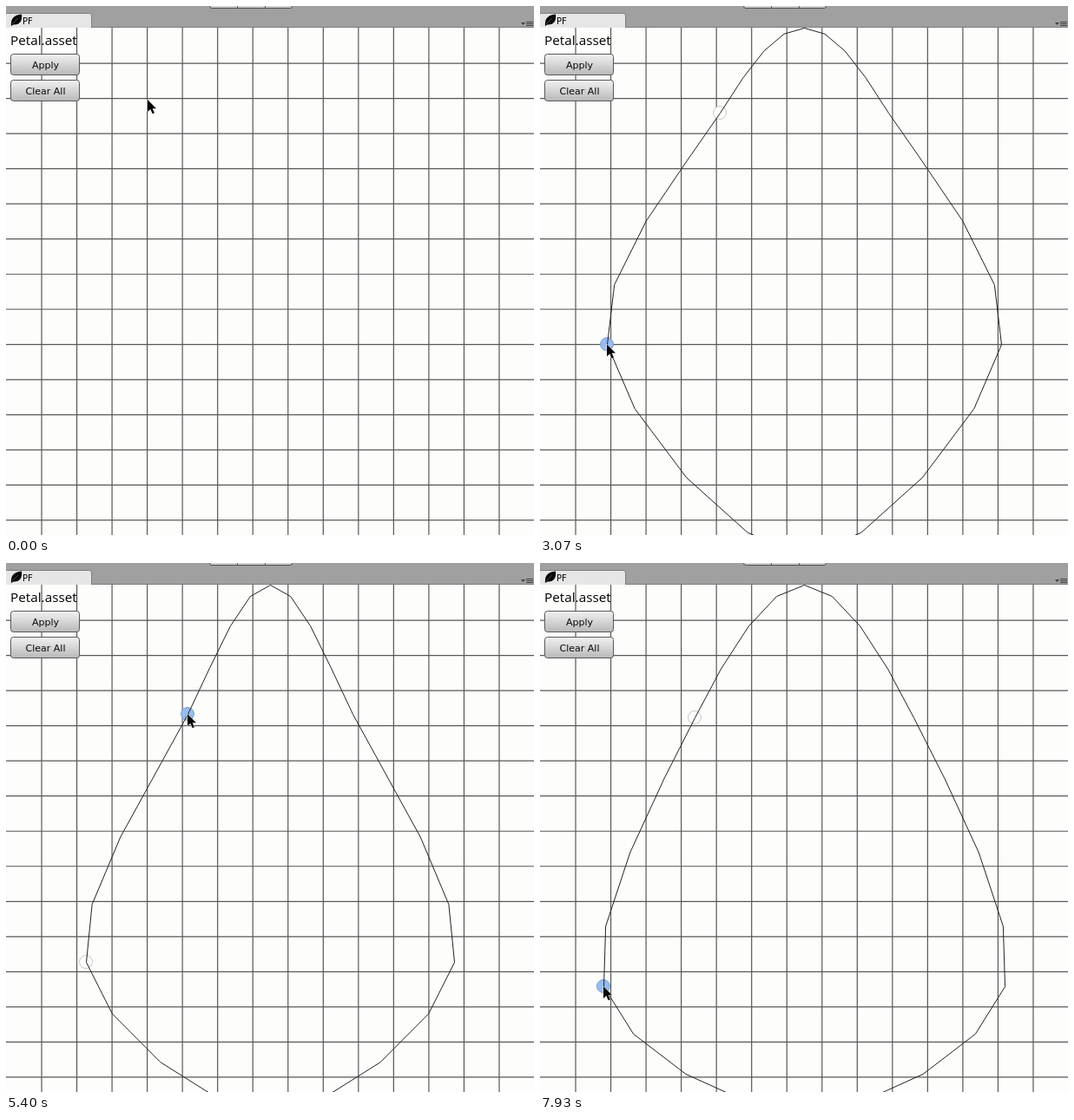
Write an HTML page that moves like this. It is 608 px wide and 610 px high and loops after 8 s.

```html
<!DOCTYPE html>
<html lang="en">
<head>
<meta charset="utf-8">
<title>Petal editor</title>
<style>
  html, body { margin: 0; width: 100%; height: 100%; overflow: hidden; background: #fdfdfc; }
  svg { display: block; width: 608px; height: 610px; }
  .ui { font-family: "DejaVu Sans", sans-serif; font-size: 11px; fill: #080808; }
  .title { font: 15.3px "Open Sans", "Noto Sans", sans-serif; fill: #000; }
  .node { stroke: #c8c8c4; fill: #fefefe; }
  .node.held { stroke: #7f9fcc; fill: #96bcf0; }
</style>
</head>
<body>
<svg viewBox="0 0 608 610">
  <defs>
    <linearGradient id="face" x2="0" y2="1">
      <stop offset="0" stop-color="#f2f2f2"/>
      <stop offset="1" stop-color="#b8b8b8"/>
    </linearGradient>
  </defs>
  <rect width="608" height="610" fill="#fdfdfc"/>
  <path id="grid" stroke="#585856" stroke-width="1.2"/>

  <circle class="node" id="upper" r="7.5"/>
  <circle class="node" id="lower" r="7.5"/>
  <path id="petal" fill="none" stroke="#222" transform="translate(.5 .5)"/>

  <g id="header">
    <rect width="608" height="25" fill="#a0a0a0"/>
    <path d="M0 24.5H608" stroke="#7c7c7c"/>
    <path d="M234.5 -4V0q0 2.5 2.5 2.5H327q2.5 0 2.5 -2.5V-4Z" fill="#d0d0d0" stroke="#505050"/>
    <path d="M266.5 0V2M298.5 0V2" stroke="#606060"/>
    <path d="M-1 25V8.5H96q2.5 0 2.5 2.5V25" fill="#e6e6e6" stroke="#808080"/>
    <path d="M6 23C5 15 9 10 18 9.5C19 17 16 22 8.5 21.5Z" fill="#080808"/>
    <path d="M7 21L14 14" stroke="#606060" stroke-width=".7"/>
    <text class="ui" x="19" y="21" style="font-size:10px">PF</text>
    <path d="M593 19h5l-2.500 3Z" fill="#404040"/>
    <path d="M599 18.500h8M599 20.500h8M599 22.500h8" stroke="#404040"/>
  </g>

  <text class="title" x="5" y="45">Petal.asset</text>
  <g id="buttons"></g>

  <path id="cursor" d="M0 0V14L3.300 11L5.600 16.300L8 15.200L5.700 10.200H10Z"
        fill="#050505" stroke="#fff" paint-order="stroke"/>
</svg>
<script>
const LOOP = 8000, FPS = 15, TRAVEL = 850;
const TOP = 25, SIZE = 608, CELL = SIZE / 15;
const $ = id => document.getElementById(id);

function drawGrid() {
  let d = '';
  for (let at = CELL; at < SIZE - 1; at += CELL) {
    d += `M${at + .5} ${TOP}V610M0 ${TOP + at + .5}H${SIZE}`;
  }
  $('grid').setAttribute('d', d);
}

function drawButtons() {
  $('buttons').innerHTML = ['Apply', 'Clear All'].map((label, i) =>
    `<g transform="translate(0 ${55 + 30 * i})">
       <rect x="5.5" y=".5" width="79" height="24" rx="3" fill="url(#face)" stroke="#585858"/>
       <text class="ui" x="45.5" y="17" text-anchor="middle">${label}</text>
     </g>`).join('');
}

// The pointer visits these stops; a named node is placed, grabbed or dragged there.
const stop = (time, x, y, node) => ({ time, x, y, node });
const tour = [
  stop(0, 163, 108),
  stop(500, 207, 123, 'upper'),
  stop(1060, 113, 317),
  stop(1700, 77, 390, 'lower'),
  stop(4000, 92, 460, 'lower'),
  stop(4850, 207, 123, 'upper'),
  stop(5400, 209, 174, 'upper'),
  stop(6500, 178, 178, 'upper'),
  stop(7400, 92, 460, 'lower'),
  stop(7930, 73, 488, 'lower')
];
const pathOf = node => tour.filter(s => s.node === node);
const tracks = { upper: pathOf('upper'), lower: pathOf('lower') };

function sample(track, t) {
  const i = track.findIndex(s => s.time > t);
  const to = track.at(i), from = i > 0 ? track[i - 1] : to;
  const start = Math.max(from.time, to.time - TRAVEL);
  const u = Math.min(1, Math.max(0, (t - start) / (to.time - start)));
  const k = u * u * (3 - 2 * u);
  return [from.x + (to.x - from.x) * k, from.y + (to.y - from.y) * k];
}

const spline = (a, b, c, d, u) => b + .5 * u * (c - a + u *
  (2 * a - 5 * b + 4 * c - d + u * (3 * (b - c) + d - a)));

// Closed Catmull-Rom outline, four straight pieces per span.
function petalPath(upper, lower) {
  const mirror = ([x, y]) => [SIZE - x, y];
  const ring = [[SIZE / 2, TOP], upper, lower, [SIZE / 2, TOP + SIZE], mirror(lower), mirror(upper)];
  const points = [];
  for (let i = 0; i < 6; i++) {
    const [a, b, c, d] = [5, 0, 1, 2].map(k => ring[(i + k) % 6]);
    for (let u = 0; u < 1; u += .25) {
      points.push([0, 1].map(axis => spline(a[axis], b[axis], c[axis], d[axis], u).toFixed(2)));
    }
  }
  return 'M' + points.join('L') + 'Z';
}

const place = (id, [x, y]) => $(id).setAttribute('transform', `translate(${x} ${y})`);

function showNode(id, t, pointer) {
  const [x, y] = sample(tracks[id], t);
  place(id, [x, y]);
  $(id).style.display = t >= tracks[id][0].time ? '' : 'none';
  $(id).classList.toggle('held', Math.hypot(pointer[0] - x, pointer[1] - y) < 8);
  return [x, y];
}

function render(now) {
  const t = Math.floor((now % LOOP + 5) * FPS / 1000) * 1000 / FPS % LOOP;
  const pointer = sample(tour, t);
  const upper = showNode('upper', t, pointer);
  const lower = showNode('lower', t, pointer);
  $('petal').setAttribute('d', t >= tracks.lower[0].time ? petalPath(upper, lower) : '');
  place('cursor', pointer);
  requestAnimationFrame(render);
}

drawGrid();
drawButtons();
render(performance.now());
</script>
</body>
</html>
```
